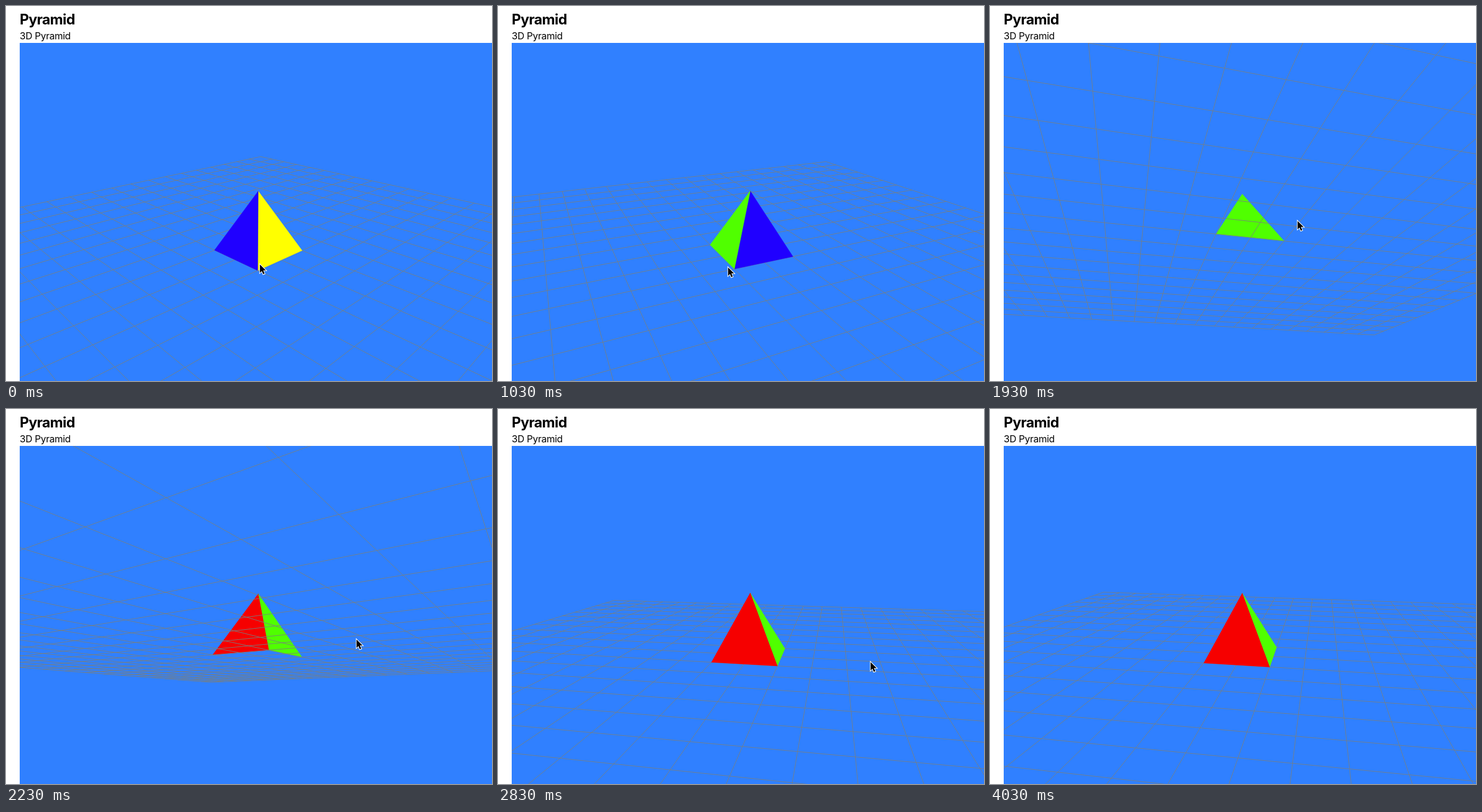
Animation, 815 px wide and 630 px high, one loop 4480 ms. Source, as an HTML page with a canvas:

```html
<!DOCTYPE html>
<html lang="en">
<head>
<meta charset="utf-8">
<title>Pyramid</title>
<style>
  html, body { margin: 0; width: 100%; height: 100%; overflow: hidden; background: #fff; }
  body { position: relative; color: #000; font-family: Inter, "Liberation Sans", sans-serif; }
  h1, p { position: absolute; left: 23px; margin: 0; white-space: nowrap; }
  h1 { top: 8px; font-size: 24px; line-height: 29px; font-weight: 700; letter-spacing: -0.65px; }
  p { top: 40px; font-size: 16px; line-height: 20px; letter-spacing: -0.25px; }
  canvas { position: absolute; left: 0; top: 0; display: block; }
</style>
</head>
<body>
<canvas id="stage" width="815" height="630"></canvas>
<h1>Pyramid</h1>
<p>3D Pyramid</p>
<script>
const ctx = document.getElementById('stage').getContext('2d');
const LOOP = 4480, RAD = Math.PI / 180;
const CX = 423, CY = 362, FOCAL = 300 / Math.tan(22.5 * RAD);
const DIST = 13.6, HALF = 10, NEAR = 0.1;
const FACES = ['#ffff00', '#2000ff', '#50ff00', '#f60000'];

// pointer while dragging: time, x, y
const DRAG = [
  [730, 266, 439],
  [1030, 385, 438],
  [1330, 500, 437],
  [1930, 515, 360],
  [2230, 587, 386],
  [2830, 624, 424],
  [2980, 625, 428]
];
const GRAB = DRAG[0], DROP = DRAG[DRAG.length - 1];
const ENTER = [0, 425, 433], LEAVE = [4030, 780, 650], REST = 3280;

const clamp = u => Math.min(1, Math.max(0, u));
const smooth = u => u * u * (3 - 2 * u);

function glide(t, t0, from, t1, to) {
  const k = smooth(clamp((t - t0) / (t1 - t0)));
  return [1, 2].map(c => from[c] + (to[c] - from[c]) * k);
}

const secant = (i, c) => (DRAG[i + 1][c] - DRAG[i][c]) / (DRAG[i + 1][0] - DRAG[i][0]);

function tangent(i, c) {
  if (i === 0 || i === DRAG.length - 1) return 0;
  const a = secant(i - 1, c), b = secant(i, c);
  return a * b > 0 ? 2 * a * b / (a + b) : 0;
}

// monotone cubic through the drag points
function dragged(t) {
  let i = 0;
  while (t >= DRAG[i + 1][0]) i++;
  const span = DRAG[i + 1][0] - DRAG[i][0];
  const u = (t - DRAG[i][0]) / span, v = 1 - u;
  return [1, 2].map(c => DRAG[i][c] * smooth(v) + DRAG[i + 1][c] * smooth(u)
    + span * u * v * (v * tangent(i, c) - u * tangent(i + 1, c)));
}

function pointerAt(t) {
  if (t < GRAB[0]) return glide(t, 0, ENTER, GRAB[0], GRAB);
  if (t < DROP[0]) return dragged(t);
  return glide(t, REST, DROP, LEAVE[0], LEAVE);
}

// orbit control: 0.6 degrees for each dragged pixel
function cameraAt(t) {
  const [x, y] = pointerAt(Math.min(DROP[0], Math.max(GRAB[0], t)));
  // the base corners sit 45 degrees off the grid axes
  const yaw = (45 - 214.8 - 0.6 * (x - DROP[1])) * RAD;
  const pitch = (14.2 + 0.6 * (y - DROP[2])) * RAD;
  const cy = Math.cos(yaw), sy = Math.sin(yaw), cp = Math.cos(pitch), sp = Math.sin(pitch);
  return {
    above: DIST * sp > -1,
    view(x, y, z) {
      const side = x * cy + z * sy, away = z * cy - x * sy;
      return [side, y * cp + away * sp, DIST + away * cp - y * sp];
    }
  };
}

const project = ([x, y, d]) => [CX + FOCAL * x / d, CY - FOCAL * y / d];

function line(a, b) {
  if (a[2] < b[2]) [a, b] = [b, a];
  if (a[2] < NEAR) return;
  if (b[2] < NEAR) {
    const k = (a[2] - NEAR) / (a[2] - b[2]);
    b = a.map((v, i) => v + (b[i] - v) * k);
  }
  ctx.moveTo(...project(a));
  ctx.lineTo(...project(b));
}

function drawGrid(cam) {
  ctx.beginPath();
  for (let i = -HALF; i <= HALF; i++) {
    line(cam.view(i, -1, -HALF), cam.view(i, -1, HALF));
    line(cam.view(-HALF, -1, i), cam.view(HALF, -1, i));
  }
  ctx.strokeStyle = '#787f80';
  ctx.lineWidth = 0.9;
  ctx.stroke();
}

function drawPyramid(cam) {
  const top = project(cam.view(0, 1, 0));
  const base = [[1, 1], [1, -1], [-1, -1], [-1, 1]].map(([x, z]) => project(cam.view(x, -1, z)));
  ctx.lineWidth = 0.5;
  FACES.forEach((color, i) => {
    const a = base[i], b = base[(i + 1) % 4];
    const turn = (a[0] - top[0]) * (b[1] - top[1]) - (a[1] - top[1]) * (b[0] - top[0]);
    if (turn <= 0) return;
    ctx.beginPath();
    [top, a, b].forEach(p => ctx.lineTo(...p));
    ctx.closePath();
    ctx.fillStyle = ctx.strokeStyle = color;
    ctx.fill();
    ctx.stroke();
  });
}

const arrow = new Path2D('M.8 1.2V15.2L4 12.2L6.3 17.6L8.7 16.6L6.4 11.3H10.9Z');

function drawPointer([x, y]) {
  ctx.save();
  ctx.translate(x, y);
  ctx.lineWidth = 2;
  ctx.strokeStyle = '#fff';
  ctx.stroke(arrow);
  ctx.fillStyle = '#000';
  ctx.fill(arrow);
  ctx.restore();
}

// the picture is held for 150 ms at a time
function hold(t) {
  const start = t < 1030 ? 0 : 1030;
  return start + Math.floor((t - start) / 150) * 150;
}

function draw(t) {
  const cam = cameraAt(t);
  ctx.clearRect(0, 0, 815, 630);
  ctx.save();
  ctx.beginPath();
  ctx.rect(23, 62, 800, 600);
  ctx.clip();
  ctx.fillStyle = '#3080ff';
  ctx.fillRect(23, 62, 800, 600);
  const parts = [drawGrid, drawPyramid];
  if (!cam.above) parts.reverse();
  parts.forEach(part => part(cam));
  ctx.restore();
  drawPointer(pointerAt(t));
}

const begin = performance.now();
function tick() {
  draw(hold((performance.now() - begin) % LOOP));
  requestAnimationFrame(tick);
}
tick();
</script>
</body>
</html>
```
